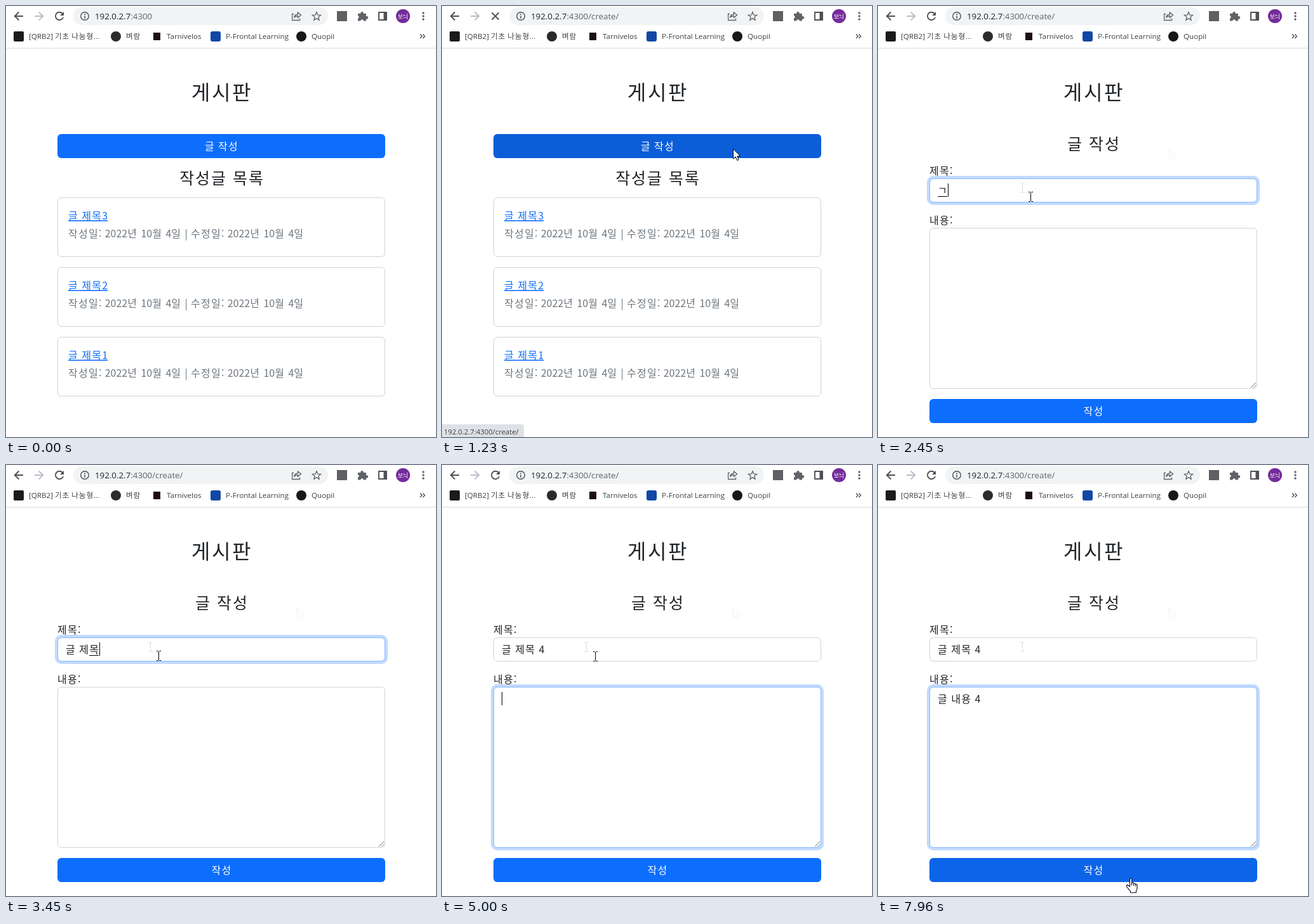
Animation, 677 px wide and 680 px high, one loop 8000 ms. Source, as an HTML page:

```html
<!DOCTYPE html>
<html lang="ko">
<head>
<meta charset="utf-8">
<title>게시판</title>
<style>
html, body { margin: 0; width: 100%; height: 100%; overflow: hidden; background: #fff; }
svg { display: block; }
text { font: 350 16px "Noto Sans CJK KR DemiLight", "Noto Sans CJK KR", "Noto Sans CJK", sans-serif; fill: #212529; white-space: pre; word-spacing: .045em; }
.k { letter-spacing: .08em; }
.mid { text-anchor: middle; }
.h1, .h3 { font-family: "Noto Sans CJK KR Light", "Noto Sans CJK KR", sans-serif; font-weight: 300; }
.h1 { font-size: 32.2px; }
.h3 { font-size: 24.9px; word-spacing: .085em; }
.link { fill: #0d6efd; text-decoration: underline; text-decoration-thickness: 1px; }
.sub { fill: #6c757d; }
.ui { font: 11.6px "Open Sans", "Noto Sans CJK KR", sans-serif; fill: #3c4043; word-spacing: 0; }
.url { font-size: 13.3px; fill: #202124; }
.url .dim { fill: #5f6368; }
.white { fill: #fff; }
.line { fill: none; stroke: #4d5156; stroke-width: 1.9; }
.box { fill: #fff; stroke: #ced4da; }
.card { fill: #fff; stroke: #d2d2d2; }
.ring rect { fill: none; stroke: #c2dbfe; stroke-width: 4; }
.ring rect + rect { stroke: #86b7fe; stroke-width: 1; }
.btn { fill: #0d6efd; }

.list, .form, .path, .status, .stop, .reload, .ghost, .arrow, .hand, .ibeam { animation: 8s step-end infinite; }
.list { animation-name: list; }
.form { animation-name: form; }
.path { animation-name: path; }
.status { animation-name: status; }
.stop { animation-name: stop; }
.reload { animation-name: reload; }
.ghost { animation-name: ghost; }
.arrow { animation-name: arrow; }
.hand { animation-name: hand; }
.ibeam { animation-name: ibeam; }
.write { animation: write 8s linear infinite; }
.send { animation: send 8s linear infinite; }
.ring1 { animation: ring1 8s linear infinite; }
.ring2 { animation: ring2 8s linear infinite; }
.pointer { animation: move 8s linear infinite; }

@keyframes list { 0% { opacity: 1 } 16.25%, 100% { opacity: 0 } }
@keyframes form { 0% { opacity: 0 } 16.25%, 100% { opacity: 1 } }
@keyframes path { 0% { opacity: 0 } 14.5%, 100% { opacity: 1 } }
@keyframes status { 0% { opacity: 0 } 10.3% { opacity: 1 } 16.25%, 100% { opacity: 0 } }
@keyframes stop { 0% { opacity: 0 } 14.5% { opacity: 1 } 17.8%, 100% { opacity: 0 } }
@keyframes reload { 0% { opacity: 1 } 14.5% { opacity: 0 } 17.8%, 100% { opacity: 1 } }
@keyframes ghost { 0% { opacity: 0 } 23%, 100% { opacity: 1 } }
@keyframes arrow { 0% { opacity: 0 } 2.62% { opacity: 1 } 9.62% { opacity: 0 } 14.5% { opacity: 1 } 22%, 100% { opacity: 0 } }
@keyframes hand { 0% { opacity: 0 } 9.62% { opacity: 1 } 14.5% { opacity: 0 } 97.7%, 100% { opacity: 1 } }
@keyframes ibeam { 0% { opacity: 0 } 22% { opacity: 1 } 97.7%, 100% { opacity: 0 } }
@keyframes write {
  0%, 9.62% { fill: #0d6efd }
  11.5%, 12.87% { fill: #0b5ed7 }
  13.3%, 13.8% { fill: #0a58ca }
  15%, 100% { fill: #0b5ed7 }
}
@keyframes send { 0%, 98.6% { fill: #0d6efd } 100% { fill: #0c60de } }
@keyframes ring1 { 0%, 22.9% { opacity: 0 } 24.8%, 60.7% { opacity: 1 } 62.4%, 100% { opacity: 0 } }
@keyframes ring2 { 0%, 60.7% { opacity: 0 } 62.4%, 100% { opacity: 1 } }
@keyframes move {
  0%, 2.62% { transform: translate(614px, 655px); animation-timing-function: steps(4) }
  6.12% { transform: translate(560px, 430px); animation-timing-function: steps(4) }
  9.62% { transform: translate(482px, 236px); animation-timing-function: steps(3) }
  12.12%, 17.9% { transform: translate(458px, 225px); animation-timing-function: step-end }
  18.75% { transform: translate(408px, 230px); animation-timing-function: step-end }
  19.5% { transform: translate(320px, 246px); animation-timing-function: step-end }
  20.37% { transform: translate(247px, 264px); animation-timing-function: step-end }
  21.12% { transform: translate(231px, 280px); animation-timing-function: step-end }
  22%, 23% { transform: translate(227px, 287px); animation-timing-function: steps(4) }
  26.5%, 53.2% { transform: translate(240px, 301px) }
  53.25%, 93.3% { transform: translate(241px, 302px); animation-timing-function: steps(2) }
  95.1% { transform: translate(282px, 400px); animation-timing-function: steps(3) }
  97.7% { transform: translate(388px, 637px); animation-timing-function: steps(2) }
  99.5%, 100% { transform: translate(398px, 652px) }
}
</style>
</head>
<body>
<svg width="677" height="680" viewBox="0 0 677 680">
  <defs>
    <path id="arrow" d="M.5.5V16.2L4.2 12.8 6.7 18.6 9.2 17.5 6.8 11.9H11.6Z" fill="#fff" stroke="#000"/>
    <path id="ibeam" d="M-3-7.5H-.5M1.5-7.5H4M.5-7V7M-3 7.5H-.5M1.5 7.5H4" fill="none" stroke="#000"/>
    <path id="hand" d="M-1.5 13V1.8Q-1.5.3 0 .3T1.5 1.8V7.4Q4.2 6.3 4.7 8.4 7 7.5 7.6 9.4 10 9 10 11.2V15.5Q10 18 8.4 20V22.7H-.4V20.6Q-3.5 17.5-5.8 14-7.7 11.2-5.6 10.6-4 10.5-1.5 13.6M1.5 7.4V11.5M4.7 8.4V12M7.6 9.4V12.5" fill="#fff" stroke="#102" stroke-width="1.1" stroke-linejoin="round"/>
  </defs>

  <g id="toolbar">
    <rect y="66" width="677" height="1" fill="#dadce0"/>
    <rect x="106" y="2" width="401" height="28" rx="14" fill="#f1f3f4"/>
    <path class="line" d="M27 16H14M20.3 9.5 13.8 16 20.3 22.5"/>
    <path class="line" d="M45 16H58M51.7 9.5 58.2 16 51.7 22.5" style="stroke:#bcbdca"/>
    <g class="reload">
      <path class="line" d="M88.6 11.6A6.2 6.2 0 1 0 90 18"/>
      <path d="M91 9V15H85Z" fill="#4d5156"/>
    </g>
    <path class="line stop" d="M78.5 10.5 89.5 21.5M89.5 10.5 78.5 21.5"/>
    <circle class="line" cx="124" cy="16" r="6.3" style="stroke-width:1.4"/>
    <path class="line" d="M124 12.3V13.9M124 15.2V19.8" style="stroke-width:1.5"/>
    <text class="ui url" x="140" y="21">192.0.2.7<tspan class="dim">:4300</tspan><tspan class="dim path" id="path"></tspan></text>
    <g style="stroke-width:1.3" fill="none" stroke="#5f6368">
      <path d="M453 12.5H450.6V22.5H462.5V19.5M453.5 18.5Q454.5 13 459.5 13V10L464.5 14.3 459.5 18.3V15.5Q455.5 15.5 453.5 18.5Z"/>
      <path id="star"/>
    </g>
    <rect x="521" y="8" width="16" height="16" fill="#5f5f64"/>
    <path d="M554 12H558.3A2.3 2.3 0 1 1 562.7 12H567V16.3A2.3 2.3 0 1 1 567 20.5V23.5H562.8A2.3 2.3 0 0 0 558.2 23.5H554V19.6A2.2 2.2 0 0 0 554 15.3Z" fill="#5f6368"/>
    <path class="line" d="M587 10H599V22H587Z"/>
    <path d="M594.5 10H600V22H594.5Z" fill="#4d5156"/>
    <circle cx="625" cy="16" r="11" fill="#742b9b"/>
    <text class="ui mid white" x="625" y="19.5" style="font-size:9px">보늬</text>
    <g fill="#5f6368"><circle cx="657" cy="11" r="1.7"/><circle cx="657" cy="16" r="1.7"/><circle cx="657" cy="21" r="1.7"/></g>
    <path class="line" d="M652 44.5 655 47.7 652 51M656.3 44.5 659.3 47.7 656.3 51" style="stroke-width:1.4"/>
    <rect x="12" y="40" width="16" height="16" rx="2" fill="#1b1b1b"/>
    <circle cx="173" cy="48" r="8" fill="#2b2b2b"/>
    <rect x="232" y="42" width="11" height="12" fill="#1c0d14"/>
    <rect x="322" y="40" width="16" height="16" rx="3" fill="#1247a5"/>
    <circle cx="465" cy="48" r="8" fill="#191717"/>
  </g>

  <g class="list" id="list">
    <rect class="btn write" x="81" y="202" width="516" height="38" rx="6"/>
  </g>

  <g class="form" id="form">
    <rect class="box" x="81.5" y="272.5" width="515" height="37" rx="5.5"/>
    <rect class="box" x="81.5" y="350.5" width="515" height="253" rx="5.5"/>
    <g class="ring ring1">
      <rect x="79" y="270" width="520" height="42" rx="8"/>
      <rect x="81.5" y="272.5" width="515" height="37" rx="5.5"/>
    </g>
    <g class="ring ring2">
      <rect x="79" y="348" width="520" height="258" rx="8"/>
      <rect x="81.5" y="350.5" width="515" height="253" rx="5.5"/>
    </g>
    <path d="M587 602 595 594M591.5 602 595 598.5" stroke="#777" fill="none"/>
    <rect class="btn send" x="81" y="620" width="516" height="38" rx="6"/>
    <g class="ghost">
      <use href="#arrow" x="458" y="225" opacity=".05"/>
      <use href="#ibeam" x="227" y="287" opacity=".15"/>
    </g>
    <text id="title" x="94" y="297"></text>
    <text id="body" x="94" y="375"></text>
    <rect id="mark" width="15" height="1"/>
    <rect id="caret" width="1" height="21"/>
  </g>

  <g class="status">
    <path d="M0 660H125Q129 660 129 664V680H0Z" fill="#dee1e6"/>
    <text class="ui" x="3" y="676" style="font-size:11.3px">192.0.2.7:4300/create/</text>
  </g>

  <g class="pointer">
    <use class="arrow" href="#arrow"/>
    <use class="ibeam" href="#ibeam"/>
    <use class="hand" href="#hand"/>
  </g>
</svg>
<script>
const $ = id => document.getElementById(id);
const spaced = s => s.replace(/[ㄱ-ㅎ가-힣]+/g, '<tspan class="k">$&</tspan>');
const add = (id, x, y, s, cls) =>
  $(id).insertAdjacentHTML('beforeend', `<text x="${x}" y="${y}" class="${cls || ''}">${spaced(s)}</text>`);

$('path').textContent = '/create/';
$('star').setAttribute('d', 'M' + Array.from({ length: 10 }, (_, i) => {
  const r = i % 2 ? 3 : 7, a = i * Math.PI / 5;
  return [489 + r * Math.sin(a), 16.6 - r * Math.cos(a)].map(v => v.toFixed(1));
}).join('L') + 'Z');

[[36, '[QRB2] 기초 나눔형...'], [189, '벼람'], [253, 'Tarnivelos'], [346, 'P-Frontal Learning'], [481, 'Quopil']]
  .forEach(([x, s]) => add('toolbar', x, 52, s, 'ui'));

add('toolbar', 340, 148, '게시판', 'mid h1');
add('list', 339.5, 227, '글 작성', 'mid white');
add('list', 340, 281, '작성글 목록', 'mid h3');
const day = '2022년 10월 4일';
[3, 2, 1].forEach((n, i) => {
  const y = 302 + 110 * i;
  $('list').insertAdjacentHTML('beforeend',
    `<rect class="card" x="81.5" y="${y + .5}" width="515" height="93" rx="5.5"/>`);
  add('list', 98, y + 35, '글 제목' + n, 'link');
  add('list', 98, y + 63, `작성일: ${day} | 수정일: ${day}`, 'sub');
});
add('form', 340, 227, '글 작성', 'mid h3');
add('form', 81, 266, '제목:');
add('form', 81, 344, '내용:');
add('form', 339.5, 645, '작성', 'mid white');

// Each entry: start time and text so far; a trailing _ marks a syllable being composed.
const typing = {
  title: [[0, ''], [2450, 'ㄱ_'], [2550, '그_'], [2650, '글_'], [2750, '글 '], [2850, '글 ㅈ_'], [3050, '글 제_'],
    [3250, '글 젬_'], [3350, '글 제모_'], [3450, '글 제목_'], [3990, '글 제목 '], [4260, '글 제목 4']],
  body: [[0, ''], [5350, 'ㄱ_'], [5460, '그_'], [5570, '글_'], [5680, '글 '], [5940, '글 ㄴ_'], [6040, '글 내_'],
    [6140, '글 냉_'], [6240, '글 내요_'], [6340, '글 내용_'], [6540, '글 내용 '], [6940, '글 내용 4']]
};
const shown = {};

function type(id, t) {
  const s = typing[id].filter(([at]) => at <= t).pop()[1];
  if (shown[id] !== s) $(id).innerHTML = spaced(s.replace('_', ''));
  shown[id] = s;
}

function place(el, x, y, on) {
  el.setAttribute('x', x);
  el.setAttribute('y', y);
  el.setAttribute('opacity', +on);
}

let start;
function frame(now) {
  start ??= now;
  const t = (now - start) % 8000;
  type('title', t);
  type('body', t);
  const id = t < 4860 ? 'title' : 'body', top = id === 'title' ? 280 : 358;
  const x = 94 + Math.round(shown[id] ? $(id).getComputedTextLength() : 0);
  place($('caret'), x, top, t >= 1840 && t < 7470);
  place($('mark'), x - 16, top + 20, shown[id].endsWith('_'));
  requestAnimationFrame(frame);
}
requestAnimationFrame(frame);
</script>
</body>
</html>
```
